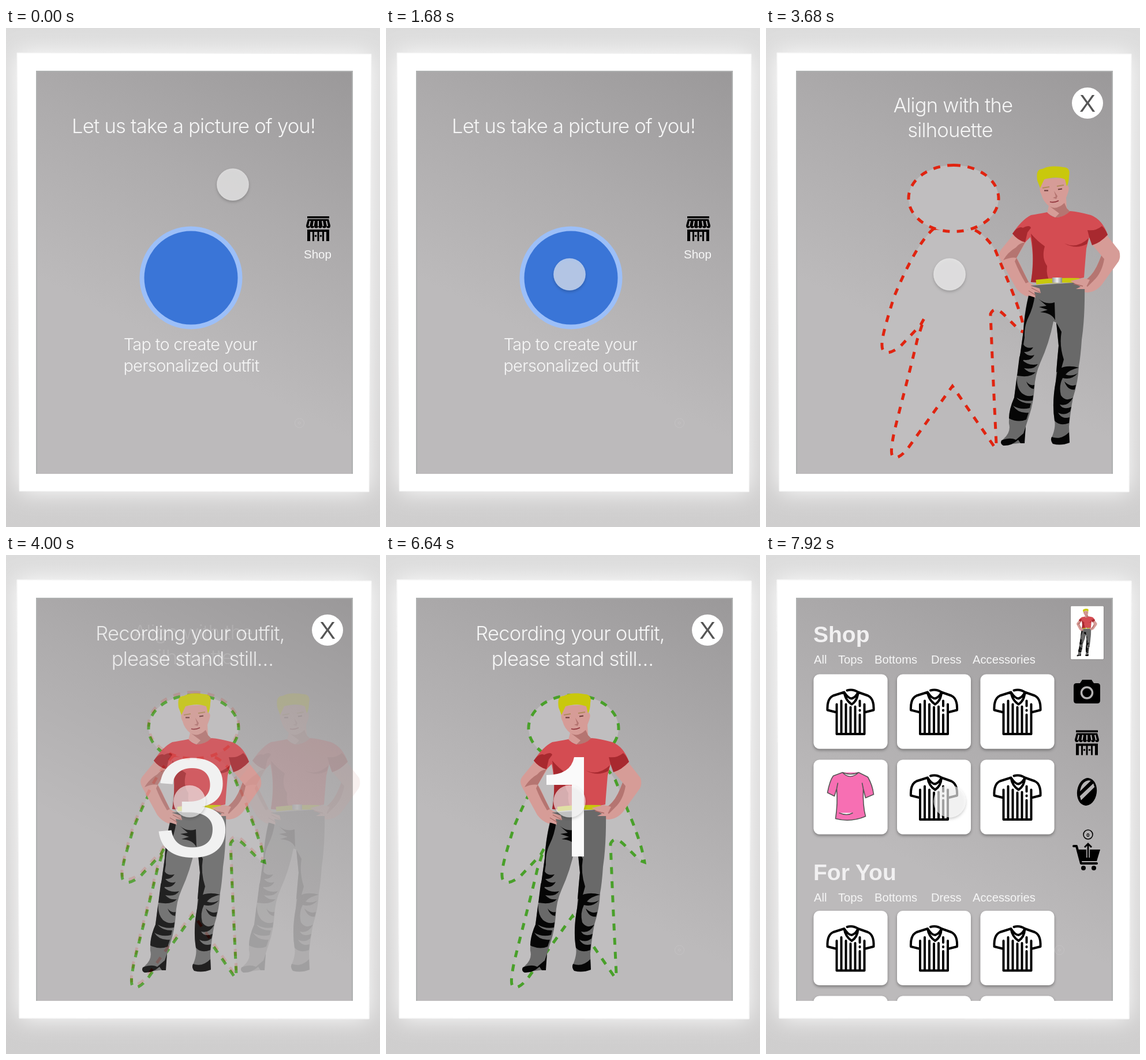
An HTML page that plays this animation: 648x864 px, repeating every 8000 ms.

```html
<!DOCTYPE html>
<html lang="en">
<head>
<meta charset="utf-8">
<title>Smart mirror</title>
<style>
html, body { margin: 0; width: 100%; height: 100%; overflow: hidden; background: #ddd; }
svg { display: block; width: 100vw; height: 100vh; }
text { fill: #f6f6f6; font-family: "Liberation Sans", Arial, sans-serif; }
.light { font-family: Inter, "Liberation Sans", sans-serif; font-weight: 300; letter-spacing: -.023em; text-anchor: middle; }
.big { font-size: 34.6px; }
.mid { font-size: 28.9px; }
.mc { text-anchor: middle; }
.head { font-size: 39px; font-weight: 700; fill: #f1f0f1; }
.tab { font-size: 20.2px; }
.num { font-size: 244px; text-anchor: middle; fill: #fafafa; }
.dash { fill: #c0bebf; stroke-width: 5; stroke-dasharray: 12 12.5; }
.line { fill: none; stroke: #000; stroke-width: 4; stroke-linecap: round; stroke-linejoin: round; }
</style>
</head>
<body>
<svg viewBox="0 0 648 864">
  <defs>
    <linearGradient id="wall" x2="0" y2="1">
      <stop stop-color="#dcdcdc"/><stop offset=".5" stop-color="#d7d6d6"/><stop offset="1" stop-color="#cfcece"/>
    </linearGradient>
    <linearGradient id="glass" gradientUnits="userSpaceOnUse" x1="560" y1="60" x2="300" y2="560">
      <stop stop-color="#9b999a"/><stop offset=".5" stop-color="#adabac"/><stop offset="1" stop-color="#bcbabb"/>
    </linearGradient>
    <linearGradient id="buckle">
      <stop stop-color="#999"/><stop offset=".5" stop-color="#eee"/><stop offset="1" stop-color="#888"/>
    </linearGradient>
    <filter id="glow" x="-20%" y="-20%" width="140%" height="140%"><feGaussianBlur stdDeviation="21"/></filter>
    <filter id="drop" x="-30%" y="-30%" width="160%" height="170%">
      <feDropShadow dx="0" dy="2.5" stdDeviation="2.5" flood-opacity=".35"/>
    </filter>
    <clipPath id="pane"><rect x="52" y="74" width="549" height="698"/></clipPath>

    <g id="mirror">
      <path d="M19 43L633 45L629 803L23 802Z" fill="#fff" stroke="#f3f3f3"/>
      <rect x="52" y="74" width="549" height="698" fill="url(#glass)"/>
      <path d="M53 772V75H600V772" fill="none" stroke="#aeb0b0" stroke-width="2"/>
    </g>

    <g id="shop">
      <path d="M2 0H40V3.5H2ZM3 5H39L42 16a3.5 4.5 0 0 1-7 0a3.5 4.5 0 0 1-7 0a3.5 4.5 0 0 1-7 0a3.5 4.5 0 0 1-7 0a3.5 4.5 0 0 1-7 0a3.5 4.5 0 0 1-7 0Z"/>
      <path d="M7 8L5 17M14 8L12.500 17M21 8V17M28 8L29.500 17M35 8L37 17" stroke="#b2b0b1" stroke-width="2.2"/>
      <path d="M2 23H40V43H35V27H31V43H28V27H22.500V43H19.500V27H14V43H11V27H7V43H2Z"/>
      <circle cx="16.500" cy="34" r="1.800"/><circle cx="25.500" cy="34" r="1.800"/>
    </g>

    <g id="close">
      <circle cx="557" cy="130" r="27" fill="#fff"/>
      <text x="557" y="145" class="mc" font-size="42" style="fill:#555">X</text>
    </g>

    <g id="outline" class="dash">
      <path d="M291 347C268 366 243 415 222 465C208 510 200 538 201 550C201 564 212 567 232 552L268 514L274 503L262 540C248 600 234 650 222 700C215 735 216 744 225 744Q236 742 250 722L323 620L397 727L399 720Q393 600 389 495Q396 480 412 496L440 524L448 527Q444 500 425 452L397 384Q378 355 355 347Z"/>
      <path d="M325 237.500a78 57.500 0 0 1 0 115a78 57.500 0 0 1 0-115"/>
    </g>

    <g id="man">
      <g fill="#d69c97">
        <path d="M304 272L312 261L348 259L350 272Q356 274 352 286L349 294L350 312L356 318Q345 328 330 328L316 320L319 308Q309 300 306 288Q302 282 304 272Z"/>
        <path d="M258 357L236 384Q230 392 236 402L262 450Q270 461 282 465L293 468L296 460L305 462L303 452L291 444L284 440L276 424Q268 404 263 398L280 370Z"/>
        <path d="M394 375Q410 370 419 358L441 386Q444 396 440 404L414 440Q404 456 386 458L370 456L364 452L374 450L358 442Q366 434 376 434L386 434Q398 424 406 404L410 394Z"/>
      </g>
      <g fill="#b57571">
        <path d="M321 309Q332 316 346 303L350 312L356 318Q345 328 330 328L337 321Z"/>
        <path d="M278 371L263 398Q254 396 240 402Q248 388 262 380Q268 372 278 371Z"/>
        <path d="M263 398L276 424L284 440L279 442Q268 424 260 404Z"/>
        <path d="M410 394L415 400Q411 424 397 437L386 448L376 442L386 434Q398 424 406 404Z"/>
        <path d="M328 282L331 292L326 294L332 296L334 291Z"/>
      </g>
      <path d="M308 277L320 275M333 274L345 272" stroke="#b08a5c" stroke-width="2" fill="none"/>
      <path d="M311 281.500H318M335 279.500L342 278.500" stroke="#6b3a3a" stroke-width="2" fill="none"/>
      <path d="M321 301Q328 303 336 299" stroke="#8e3038" stroke-width="1.800" fill="none"/>
      <path d="M299 264C297 250 300 244 308 244C318 238 335 239 344 241C354 241 356 248 354 256C354 264 352 272 350 274L347 262C335 257 322 259 311 262L304 277Z" fill="#c9c80c"/>

      <path d="M288 446Q330 443 381 440Q382 500 376 540Q374 570 371 585Q370 612 361 640Q357 660 354 690L355 718L326 720Q321 714 326 704Q331 690 329 680Q324 650 331 612Q332 590 336 550L332 510L327 508Q320 545 304 580Q295 600 294 625Q292 650 286 668L279 690L276 718L240 722Q233 718 240 712Q254 700 250 685Q249 665 259 640Q263 610 265 598Q270 560 275 525Q276 490 288 446Z" fill="#696969"/>
      <g fill="#060606">
        <path d="M284 464L295 462Q292 484 284 500Q276 516 277 536Q272 562 277 572Q268 584 265 598Q270 560 275 525Q277 492 284 464Z"/>
        <path d="M301 469Q314 480 329 475L330 506Q324 493 304 492L317 488L302 483L315 481Z"/>
        <path d="M332 510L341 526Q337 550 345 574L340 592L332 596Q334 570 336 550Z"/>
        <path d="M275 548Q280 556 292 553Q286 562 276 561Q284 570 294 566Q288 578 272 574Q284 586 300 582Q294 592 276 589Q284 598 296 596Q288 606 264 602L268 570Z"/>
        <path d="M264 600Q262 622 272 632Q282 640 292 636L291 645Q276 648 263 640Q270 650 288 650L286 658Q270 662 257 654Q266 668 284 666L280 678Q266 684 250 676Q250 660 259 640Z"/>
        <path d="M334 592Q348 582 371 588Q354 592 348 600Q358 604 369 598Q358 610 343 606Q336 620 340 636Q348 648 361 640Q352 656 338 652Q344 662 358 656L356 664Q346 672 335 666Q342 678 355 674L354 684Q338 690 329 680Q324 650 331 612Z"/>
        <path d="M346 612Q356 622 366 618L364 626Q352 628 346 612ZM280 612Q286 620 294 618L293 625Q284 624 280 612Z"/>
        <path d="M237 714Q252 708 262 713L275 702L279 690L277 719L270 719L266 713Q254 724 240 723Q234 720 237 714Z"/>
        <path d="M324 708Q340 714 354 700L355 718Q340 724 326 720Q321 714 324 708Z"/>
      </g>

      <path d="M316 319Q300 322 288 324Q272 332 256 356Q266 368 278 371L287 362Q295 400 288 440Q330 444 380 432Q382 405 384 382L389 362L394 376Q408 372 421 358Q412 332 392 324Q370 318 356 317Q345 328 330 328Q320 324 316 319Z" fill="#d44c52"/>
      <g fill="#a8292f">
        <path d="M256 356Q266 342 274 346Q286 340 288 346L282 354L278 371Q264 367 256 356Z"/>
        <path d="M386 350Q400 352 411 343Q417 348 421 358Q408 372 394 376L389 362Z"/>
        <path d="M288 356Q298 368 312 378Q306 398 316 412Q314 430 322 441L288 440Q295 400 288 356Z"/>
        <path d="M346 373Q368 383 388 364L385 374Q366 384 346 373Z"/>
      </g>
      <path d="M297 440Q330 436 372 437" fill="none" stroke="#c9c80c" stroke-width="8"/>
      <rect x="325" y="432" width="17" height="9" fill="url(#buckle)"/>
      <path d="M280 444L303 451L305 459L294 457L296 467L284 463ZM356 438L378 433L390 436L382 452L366 452L374 448Z" fill="#d69c97"/>
      <path d="M284 455L297 463M289 450L304 458M362 443L378 447" stroke="#a86964" stroke-width="1.300"/>
    </g>

    <g id="record">
      <use href="#mirror"/>
      <use href="#close"/>
      <text class="light big" x="319" y="148">Recording your outfit,</text>
      <text class="light big" x="323" y="192">please stand still…</text>
      <use href="#outline" y="5" stroke="#49a02a"/>
      <use href="#man"/>
    </g>

    <g id="tee" class="line">
      <path d="M53 31L34 37Q23 42 24 62L40 66M40 52V103.500H88V52M88 66L104 62Q105 42 94 37L77 31M53 31Q55 45 66 52Q76 46 77 31M58 28Q68 25 77 31M53 31Q60 42 66 42Q73 40 77 31"/>
      <path d="M48 46V102M56 52V102M64 57V102M72 56V102M80 46V55M80 62V63M80 70V102"/>
    </g>
    <path id="pink" d="M50 22Q64 28 78 22L94 30Q102 44 104 60L90 66L86 50Q85 80 90 98Q64 109 38 102Q42 76 40 50L36 63L24 57Q28 36 34 28ZM50 22Q63 36 78 22M86 50L84 40M40 50L42 40M44 92Q58 98 68 92" fill="#f76fb3" stroke="#555" stroke-width="1.600" stroke-linejoin="round"/>
  </defs>

  <rect width="648" height="864" fill="url(#wall)"/>
  <path d="M19 43L633 45L629 803L23 802Z" fill="#fff" filter="url(#glow)"/>

  <g>
    <use href="#mirror"/>
    <text class="light big" x="325" y="182">Let us take a picture of you!</text>
    <circle cx="320.500" cy="432.500" r="85" fill="#3a75d7" stroke="#9cbff8" stroke-width="8"/>
    <text class="light mid" x="319.500" y="558">Tap to create your</text>
    <text class="light mid" x="321" y="595">personalized outfit</text>
    <use href="#shop" x="520" y="326"/>
    <text class="mc" x="540" y="399" font-size="20.500">Shop</text>
  </g>
  <g class="screen">
    <use href="#mirror"/>
    <use href="#close"/>
    <text class="light big" x="324" y="146">Align with the</text>
    <text class="light big" x="319" y="189">silhouette</text>
    <use href="#outline" stroke="#e02410"/>
    <use href="#man" x="171"/>
  </g>
  <g class="screen"><use href="#record"/><text class="num" x="323" y="522">3</text></g>
  <g class="screen"><use href="#record"/><text class="num" x="320" y="522">2</text></g>
  <g class="screen"><use href="#record"/><path d="M322 522V398H278V381Q320 381 326 350H343V522Z" fill="#fafafa"/></g>
  <g class="screen">
    <use href="#mirror"/>
    <g id="store" clip-path="url(#pane)"></g>
    <rect x="527.500" y="88" width="58" height="93" rx="2" fill="#fff" stroke="#8a8889"/>
    <use href="#man" transform="translate(498.400 52.400) scale(.17)"/>
    <path d="M538 222H544L548 216H564L568 222H574Q579 222 579 227V252Q579 257 574 257H538Q533 257 533 252V227Q533 222 538 222Z"/>
    <circle cx="556" cy="238.500" r="9.500" fill="none" stroke="#b5b3b4" stroke-width="3.500"/>
    <use href="#shop" x="535" y="303.500"/>
    <g transform="rotate(8 556 410)">
      <ellipse cx="556" cy="410" rx="17" ry="24"/>
      <path d="M544 411Q544 394 556 390L560 390ZM545 419L565 394L568 400L548 426Z" fill="#b5b3b4"/>
    </g>
    <circle cx="558" cy="484" r="8" fill="none" stroke="#000" stroke-width="1.600"/>
    <text class="mc" x="558" y="487.500" font-size="9.500" font-weight="700" style="fill:#000">0</text>
    <path d="M533 504H538L546 534H573" class="line"/>
    <path d="M540 510H579L573 530H546Z"/>
    <path d="M558 524V502M552 506L558 500L564 506" fill="none" stroke="#b0aeaf" stroke-width="6"/>
    <path d="M558 524V502M552 506L558 500L564 506" fill="none" stroke="#000" stroke-width="2.800"/>
    <circle cx="550" cy="542" r="4"/><circle cx="568" cy="542" r="4"/>
  </g>

  <g id="spot" fill="none" stroke="#c9c7c8" opacity=".6">
    <circle cx="508.500" cy="684" r="8"/><circle cx="508.500" cy="684" r="2"/>
  </g>
  <g id="cursor" filter="url(#drop)">
    <circle r="27.500" fill="#f8f8f8" fill-opacity=".6" stroke="#fff" stroke-opacity=".25"/>
  </g>
</svg>
<script>
const LOOP = 8000, FADE = 300;
const starts = [1740, 3805, 5300, 6290, 7250];
const screens = document.querySelectorAll('.screen');
const cursor = document.getElementById('cursor');
const spot = document.getElementById('spot');

const tabs = [['All', 83], ['Tops', 125], ['Bottoms', 188], ['Dress', 286], ['Accessories', 358]];

function card(col, y, icon) {
  return `<g transform="translate(${82.5 + col * 144.5} ${y})">
    <rect width="128" height="129" rx="10" fill="#fff" filter="url(#drop)"/><use href="#${icon}"/></g>`;
}

function section(title, y, rows) {
  let out = `<text class="head" x="82" y="${y}">${title}</text>`;
  for (const [name, x] of tabs) out += `<text class="tab" x="${x}" y="${y + 37}">${name}</text>`;
  rows.forEach((top, r) => {
    for (let c = 0; c < 3; c++) out += card(c, top, title === 'Shop' && r === 1 && c === 0 ? 'pink' : 'tee');
  });
  return out;
}

document.getElementById('store').innerHTML =
  section('Shop', 151, [206.5, 354.5]) + section('For You', 563, [616, 763.5]);

const clamp = v => Math.min(1, Math.max(0, v));
const easeOut = v => 1 - (1 - v) ** 1.8;
const easeInOut = v => (1 - Math.cos(Math.PI * v)) / 2;

function bezier(a, b, c, d, k) {
  const m = 1 - k;
  return m * m * m * a + 3 * m * m * k * b + 3 * m * k * k * c + k * k * k * d;
}

function draw(t) {
  screens.forEach((el, i) => {
    const p = easeOut(clamp((t - starts[i]) / FADE));
    el.setAttribute('opacity', p);
    el.setAttribute('visibility', p ? 'visible' : 'hidden');
  });
  const k = easeInOut(clamp((t - 30) / 870));
  const x = bezier(393, 330, 265, 318, k), y = bezier(271, 300, 380, 426.5, k);
  cursor.setAttribute('transform', `translate(${x} ${y})`);
  spot.setAttribute('visibility', t < 1800 || t > 4240 ? 'visible' : 'hidden');
}

const begin = performance.now();
function tick() {
  draw((performance.now() - begin) % LOOP);
  requestAnimationFrame(tick);
}
draw(0);
requestAnimationFrame(tick);
</script>
</body>
</html>
```
